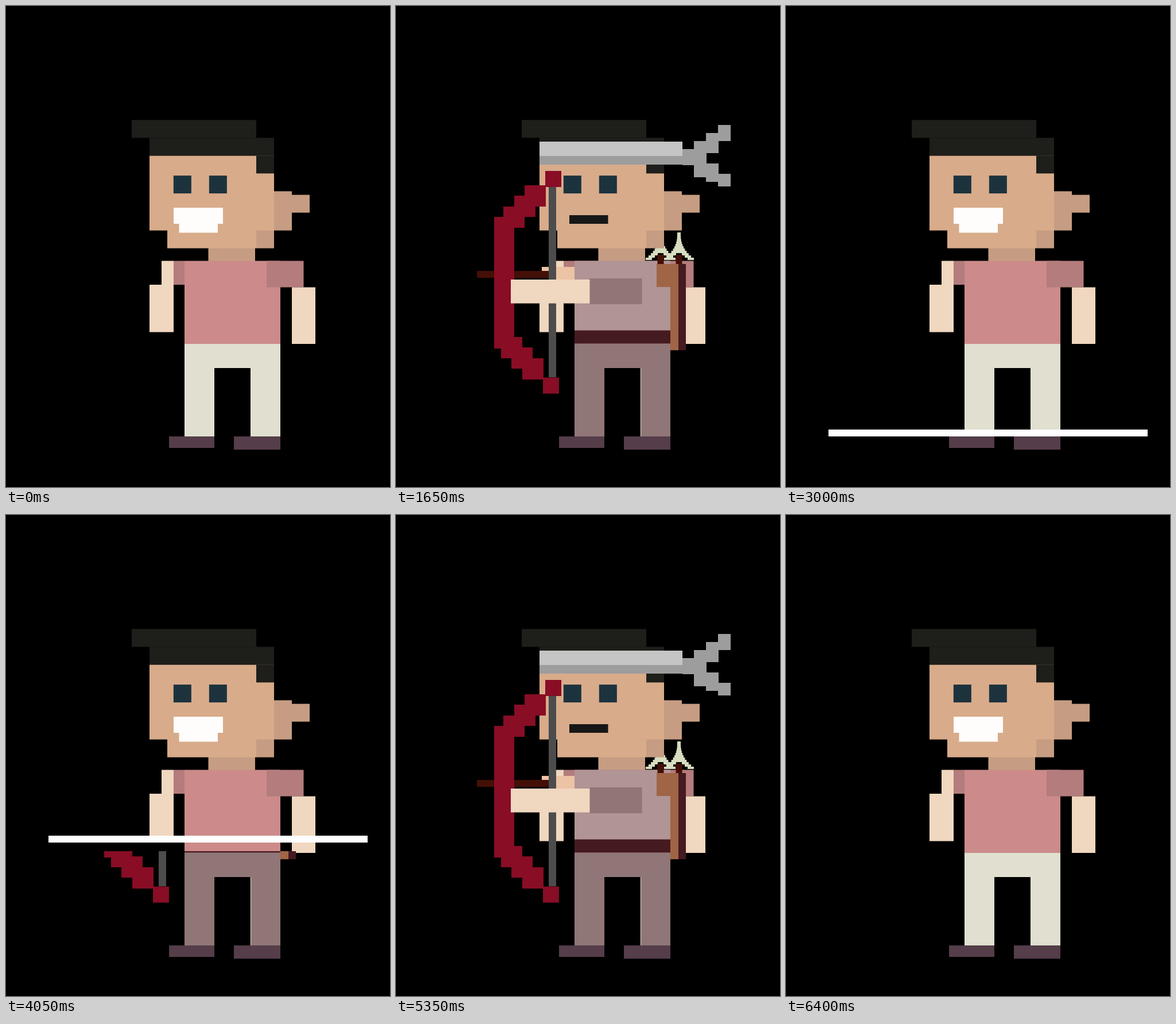
Animation of 669x837 px, one loop 6.5 s. Source, as an HTML page with a canvas:

```html
<!DOCTYPE html>
<html lang="en">
<head>
<meta charset="utf-8">
<title>Outfit scan</title>
<style>
html, body { margin: 0; width: 100%; height: 100%; overflow: hidden; background: #000; }
canvas { display: block; }
</style>
</head>
<body>
<canvas id="stage" width="669" height="837"></canvas>
<script>
const W = 669, H = 837;
const LOOP = 6500, STEP = 50, REPEAT = 3200;
const TOP = 37, BOTTOM = 809;

// Body landmarks and the size of one head pixel
const LEFT = 311, RIGHT = 478, SHOULDER = 443.5, HIP = 588, FOOT = 749;
const CELL = 31, HEAD_X = 219, HEAD_Y = 198.4;

const SKIN = '#d8ab8a', SHADE = '#c69d82', ARM = '#f0d7c0', HAIR = '#1e1e1a';
const SLEEVE = '#b47c7c', CLOTH = '#907676', MAROON = '#451a20', WOOD = '#440f06';
const LEATHER = '#a06446', CRIMSON = '#880d25', GREY = '#9d9d9d';

const ctx = document.getElementById('stage').getContext('2d');

function rect(color, x, y, w, h) {
  ctx.fillStyle = color;
  ctx.fillRect(x, y, w, h);
}

// Box measured in head pixels
function cell(color, col, row, w, h) {
  rect(color, HEAD_X + col * CELL, HEAD_Y + row * CELL, w * CELL, h * CELL);
}

function drawHead() {
  rect(SHADE, 352.5, 420, 81.5, 24);
  cell(SHADE, 7, 6, 1, 1.2);
  cell(SKIN, 2, 6, 5, 1.2);
  cell(SKIN, 1, 2, 7, 4.2);
  cell(HAIR, 0, 0, 7, 1);
  cell(HAIR, 1, 1, 7, 1);
  cell(HAIR, 7, 2, 1, 1);
  cell(SHADE, 8, 4, 1, 2.2);
  cell(SHADE, 9, 4.2, 1, 1);
  for (const col of [2.35, 4.35]) cell('#1c333e', col, 3.12, 1, 1);
  rect('#fefdfb', 292, 351, 86, 28);
  rect('#fefdfb', 301.5, 378, 67.5, 16.5);
}

function trousers(color, seam) {
  rect(color, LEFT, HIP, RIGHT - LEFT, 42);
  rect(color, LEFT, 629, 52, FOOT - 629);
  rect(color, 426 + seam, 629, 52 - seam, FOOT - 629);
}

function drawBody() {
  rect('#cc8b8a', LEFT, SHOULDER, RIGHT - LEFT, HIP - SHOULDER);
  rect(SLEEVE, 292, SHOULDER, 19, 41.5);
  rect(SLEEVE, 454, SHOULDER, 64.5, 46);
  rect(ARM, 271, SHOULDER, 21, 42);
  rect(ARM, 250, 485, 42, 82.5);
  rect(ARM, 498, 489.5, 41, 98.5);
  trousers('#e1dfd0', 0);
  rect('#553d4a', 284, FOOT, 79, 20);
  rect('#553d4a', 397, FOOT, 81, 23);
}

// Two flared arrowheads, hollow underneath
function drawArrowheads() {
  const rows = 11;
  for (const x of [461, 493]) {
    for (let k = 0; k <= rows; k++) {
      const half = 3 + 23 * (k / rows) ** 2.5;
      const gap = Math.max(0, 5 * (k - 8));
      const y = 394 + 4 * k;
      for (const side of [-half, gap]) rect('#d8dcc0', x + side, y, half - gap, 4);
    }
    rect(WOOD, x - 5.5, 433, 11, 16);
  }
}

function drawHeadgear() {
  rect('#c5c5c5', 250, 236, 249, 25);
  rect(GREY, 250, 261, 249, 15);
  rect(GREY, 499, 249, 21, 28);
  for (let i = 0; i < 3; i++) {
    const x = 519 + 21 * i;
    rect(GREY, x, 235 - 14 * i, 22, 42 - 7 * i);
    rect(GREY, x, 256 + 18 * i, 22, 42 - 10 * i);
  }
  rect(SKIN, 290, 349, 90, 47);
  rect('#171717', 302, 364, 67.5, 15);
}

function drawClothes() {
  rect('#b19495', LEFT, SHOULDER, RIGHT - LEFT, HIP - SHOULDER);
  rect(CLOTH, 337, 474, 91.5, 45);
  rect(MAROON, LEFT, 564.5, RIGHT - LEFT, 23);
  trousers(CLOTH, 1);
  for (const x of [461, 493]) rect(WOOD, x - 5.5, 433, 11, 16);
  rect(LEATHER, 454, 449, 38, 40);
  rect(LEATHER, 478, 449, 14, 150);
  rect(MAROON, 492, 449, 13, 150);
}

function drawBow() {
  const step = 18.4, size = 37;
  rect('#edc3a6', 254, 454, 12, 7);
  rect('#edc3a6', 279, 454, 32, 22);
  rect(WOOD, 141, 461, 125, 12);
  rect(CRIMSON, 171, 367, 35, 229);
  for (let i = 0; i < 3; i++) {
    const d = i * step;
    rect(CRIMSON, Math.round(224 - d), Math.round(312 + d), size, size);
    rect(CRIMSON, Math.round(183 + d), Math.round(576 + d), size, size);
  }
  rect('#4c4c4c', 266, 315, 13, 331);
  rect(CRIMSON, 260, 287, 28, 28);
  rect(CRIMSON, 256, 646.5, 28, 28);
  rect(ARM, 200, 476, 137.5, 41.5);
}

function below(edge, ...layers) {
  ctx.save();
  ctx.beginPath();
  ctx.rect(0, edge, W, H);
  ctx.clip();
  for (const layer of layers) layer();
  ctx.restore();
}

function ease(time, start, span) {
  const u = Math.min(1, Math.max(0, (time - start) / span));
  return u * u * (3 - 2 * u);
}

// Scan bar position (null when hidden) and the top edge of the visible outfit
function scan(c) {
  if (c < 600) return { bar: null, edge: H };
  if (c < 1350) {
    const bar = Math.round(BOTTOM + (TOP - BOTTOM) * ease(c, 583, 700));
    return { bar, edge: bar + 27 };
  }
  if (c < 2550) return { bar: null, edge: 0 };
  if (c < 3150) {
    const bar = Math.round(TOP + (BOTTOM - TOP) * ease(c, 2585, 511));
    return { bar, edge: bar + 61 };
  }
  return { bar: null, edge: H };
}

function draw(t) {
  const { bar, edge } = scan(t >= 3300 ? t - REPEAT : t);
  rect('#000', 0, 0, W, H);
  below(edge, drawArrowheads);
  drawHead();
  drawBody();
  below(edge, drawHeadgear, drawClothes, drawBow);
  if (bar !== null) rect('#fefefe', 74, bar, 556, 12);
}

const begin = performance.now();
function tick() {
  const t = (performance.now() - begin) % LOOP;
  draw(Math.floor(t / STEP) * STEP);
  requestAnimationFrame(tick);
}
tick();
</script>
</body>
</html>
```
